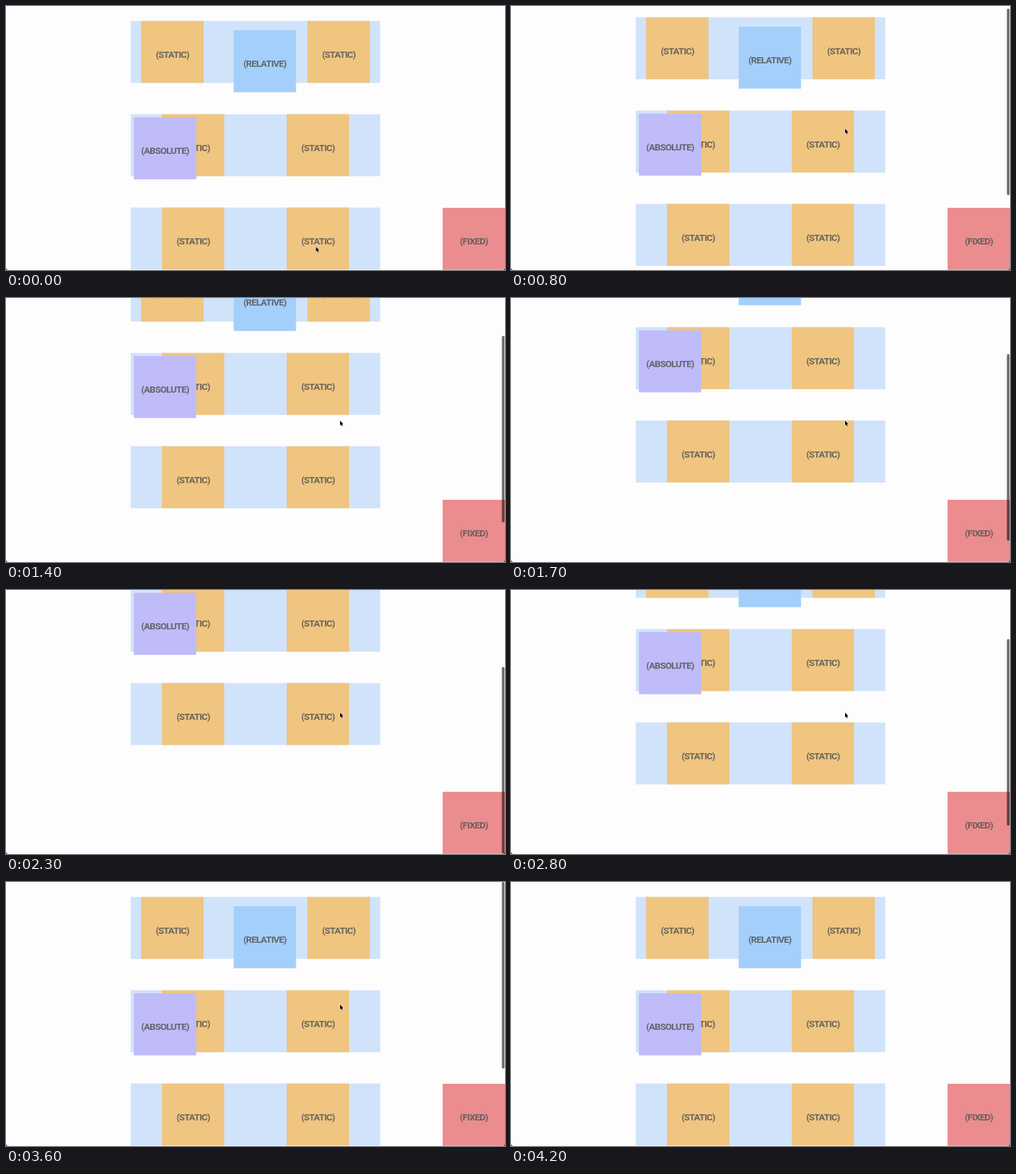
An HTML page with a canvas for the animation above (4500 ms loop, 720 by 382 pixels).

```html
<!DOCTYPE html>
<html lang="en">
<head>
<meta charset="utf-8">
<title>CSS positions</title>
<style>
html, body { margin: 0; width: 100%; height: 100%; overflow: hidden; background: #fdfdfd; }
canvas { display: block; width: 720px; height: 382px; }
</style>
</head>
<body>
<canvas id="stage" width="720" height="382"></canvas>
<script>
const ctx = document.getElementById('stage').getContext('2d');
const W = 720, H = 382, LOOP = 4500, STEP = 100;
const BOX = 90, BOX_H = 89.7, ROW_TOP = 21.6, ROW_GAP = 135, ROW_X = 180;
const MAX_SCROLL = 158, THUMB = 270;
const COLORS = {
  page: '#fdfdfd', row: '#d1e3fb', STATIC: '#efc580',
  RELATIVE: '#a4cffb', ABSOLUTE: '#c0bbf9', FIXED: '#eb8d8f'
};

const lerp = (a, b, u) => a + (b - a) * u;
const progress = (t, from, to) => Math.min(1, Math.max(0, (t - from) / (to - from)));
const smooth = u => u * u * (3 - 2 * u);

// Down with a quick start and a long settling, then back up
function scrollAt(t) {
  const down = smooth(progress(t, 690, 2400) ** 0.807);
  const up = smooth(progress(t, 2420, 3346));
  return MAX_SCROLL * (down - up);
}

// Moves to its resting place, waits out the scrolling, leaves at the bottom
function cursorAt(t) {
  const arrive = smooth(progress(t, 0, 300));
  const leave = smooth(progress(t, 3800, 4200));
  return {
    x: lerp(447.3, 482, arrive - leave),
    y: lerp(lerp(348.5, 177.5, arrive), H + 8, leave)
  };
}

function box(kind, x, y) {
  ctx.fillStyle = COLORS[kind];
  ctx.fillRect(x, y, BOX, BOX_H);
  ctx.fillStyle = 'rgba(85, 85, 85, 0.85)';
  ctx.fillText(`(${kind})`, x + BOX / 2, y + 53.3);
}

// Spreads the static boxes as "space-around" does; skipped slots stay empty
function row(index, scroll, slots, skipped) {
  const y = ROW_TOP + ROW_GAP * index - scroll;
  const pitch = 4 * BOX / slots;
  ctx.fillStyle = COLORS.row;
  ctx.fillRect(ROW_X, y, 4 * BOX, BOX_H);
  for (let i = 0; i < slots; i++) {
    if (i !== skipped) box('STATIC', ROW_X + pitch * (i + 0.5) - BOX / 2, y);
  }
  return y;
}

function scrollbar(scroll, alpha) {
  const top = scroll / MAX_SCROLL * (H - THUMB);
  ctx.fillStyle = `rgba(0, 0, 0, ${alpha})`;
  ctx.beginPath();
  ctx.roundRect(715.5, top, 3.8, THUMB, 1.9);
  ctx.fill();
}

function cursor({ x, y }) {
  const arrow = new Path2D('M0 0V6.8L1.5 5.5L2.6 8L3.8 7.4L2.8 5L4.8 4.9Z');
  ctx.save();
  ctx.translate(x, y);
  ctx.lineJoin = 'round';
  ctx.strokeStyle = '#fff';
  ctx.stroke(arrow);
  ctx.fillStyle = '#000';
  ctx.fill(arrow);
  ctx.restore();
}

function windowCorners() {
  ctx.fillStyle = '#555';
  for (const [x, dir] of [[0, 1], [W, -1]]) {
    ctx.beginPath();
    ctx.moveTo(x, H - 2.5);
    ctx.lineTo(x, H);
    ctx.lineTo(x + 2.5 * dir, H);
    ctx.fill();
  }
}

function draw(t) {
  const scroll = scrollAt(t);
  ctx.fillStyle = COLORS.page;
  ctx.fillRect(0, 0, W, H);
  ctx.font = 'bold 13.5px Roboto, sans-serif';
  ctx.letterSpacing = '-0.8px';
  ctx.textAlign = 'center';

  const first = row(0, scroll, 3, 1);
  box('RELATIVE', ROW_X + 1.5 * BOX + 13.5, first + 13.5);
  const second = row(1, scroll, 2);
  box('ABSOLUTE', ROW_X + 4.5, second + 4.5);
  row(2, scroll, 2);
  box('FIXED', W - BOX, H - BOX);

  if (t >= 800) scrollbar(scroll, 0.57 * (1 - progress(t, 3800, 4100)));
  windowCorners();
  cursor(cursorAt(t));
}

const start = performance.now();
function tick() {
  const t = (performance.now() - start) % LOOP;
  draw(Math.floor(t / STEP) * STEP);
  requestAnimationFrame(tick);
}
tick();
</script>
</body>
</html>
```
